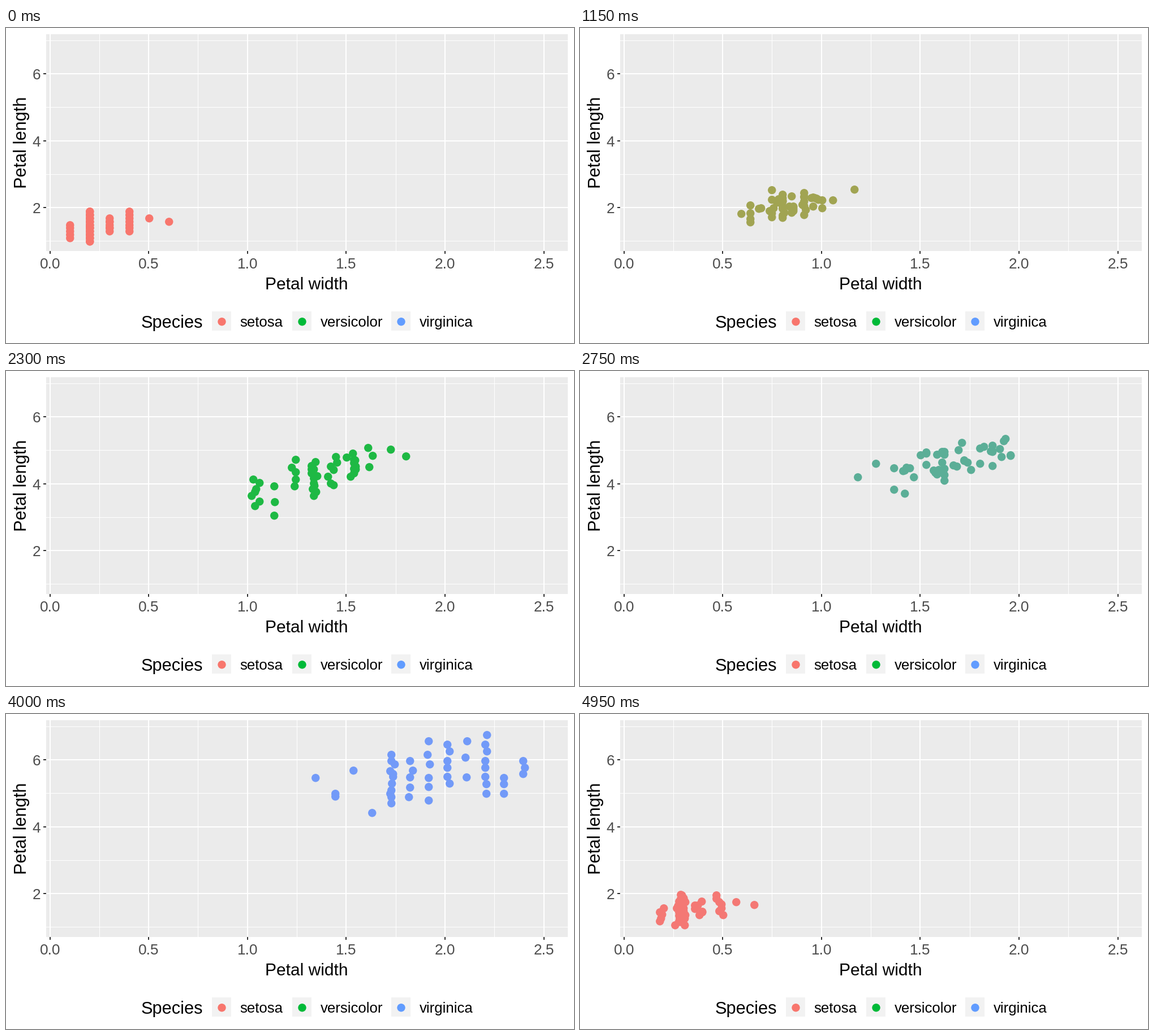
Animation, 1004 px wide and 558 px high, one loop 5 s. Source, as a matplotlib script:

```python
import random

import matplotlib.pyplot as plt
import numpy as np
from matplotlib.animation import FuncAnimation
from matplotlib.patches import Circle, Rectangle

plt.rcParams["text.hinting"] = "native"

W, H, DPI = 1004, 558, 64
FRAMES, INTERVAL = 100, 50
LEFT, TOP, RIGHT, BOTTOM = 71, 11, 993, 395
RADIUS = 7.2

COLORS = np.array([[248, 118, 109], [0, 186, 56], [97, 156, 255]]) / 255
MOVES = [(11, 33), (45, 67), (79, 100)]  # first and last frame of each move

TO_XYZ = np.array([[.4124564, .3575761, .1804375],
                   [.2126729, .7151522, .0721750],
                   [.0193339, .1191920, .9503041]])
WHITE = TO_XYZ.sum(axis=1)
TO_LAB = np.array([[0, 116, 0], [500, -500, 0], [0, 200, -200]])


def make_species(first_width, columns, seed):
    """Stack flowers in columns 0.1 apart, each (count, shortest, longest)."""
    flowers = [(first_width + i / 10, round(length, 1))
               for i, (count, low, high) in enumerate(columns)
               for length in np.linspace(low, high, count)]
    random.Random(seed).shuffle(flowers)
    return np.array(flowers).T


setosa = make_species(.1, [
    (5, 1.1, 1.5), (29, 1.0, 1.9), (7, 1.3, 1.7), (7, 1.3, 1.9),
    (1, 1.7, 1.7), (1, 1.6, 1.6)], seed=1)
versicolor = make_species(1.0, [
    (7, 3.3, 4.1), (3, 3.0, 3.9), (5, 3.9, 4.7), (13, 3.6, 4.6),
    (7, 3.9, 4.8), (10, 4.2, 4.9), (3, 4.5, 5.1), (1, 5.0, 5.0),
    (1, 4.8, 4.8)], seed=2)
virginica = make_species(1.4, [
    (1, 5.6, 5.6), (2, 5.0, 5.1), (1, 5.8, 5.8), (1, 4.5, 4.5),
    (11, 4.8, 6.3), (5, 5.0, 6.1), (6, 4.9, 6.7), (6, 5.4, 6.6),
    (3, 5.6, 6.7), (8, 5.1, 6.9), (3, 5.1, 5.6), (3, 5.7, 6.1)], seed=3)
SPECIES = [setosa, versicolor, virginica]


def rgb_to_lab(rgb):
    linear = np.where(rgb > .04045, ((rgb + .055) / 1.055) ** 2.4, rgb / 12.92)
    xyz = TO_XYZ @ linear / WHITE
    f = np.where(xyz > .008856, np.cbrt(xyz), 7.787 * xyz + 16 / 116)
    return TO_LAB @ f


def lab_to_rgb(lab):
    f = np.linalg.solve(TO_LAB, lab)
    xyz = np.where(f > .2069, f ** 3, (f - 16 / 116) / 7.787) * WHITE
    linear = np.clip(np.linalg.solve(TO_XYZ, xyz), 0, 1)
    rgb = np.where(linear > .0031308, 1.055 * linear ** (1 / 2.4) - .055,
                   12.92 * linear)
    return np.clip(rgb, 0, 1)


def bounce_in(p):
    t = 1 - p
    if t < 4 / 11:
        out = 121 / 16 * t * t
    elif t < 8 / 11:
        out = 363 / 40 * t * t - 99 / 10 * t + 17 / 5
    elif t < 9 / 10:
        out = 4356 / 361 * t * t - 35442 / 1805 * t + 16061 / 1805
    else:
        out = 54 / 5 * t * t - 513 / 25 * t + 268 / 25
    return 1 - out


def grid_x(value):
    return 78 + 349.2 * value


def grid_y(value):
    return 436.75 - 59.17 * value


def dot_x(value):
    return np.floor(78.6 + 349.5 * value) + .25


def dot_y(value):
    return np.floor(438 - 59.3 * value) + .25


fig = plt.figure(figsize=(W / DPI, H / DPI), dpi=DPI, facecolor="white")
ax = fig.add_axes([0, 0, 1, 1])
ax.set_xlim(0, W)
ax.set_ylim(H, 0)
ax.axis("off")


def box(x, y, w, h, color):
    ax.add_patch(Rectangle((x, y), w, h, facecolor=color, linewidth=0,
                           antialiased=False))


def dot(x, y, color):
    return ax.add_patch(Circle((x, y), RADIUS, facecolor=color, linewidth=0))


def label(x, y, text, size, color="black", ha="left", rotation=0):
    ax.text(x, y, text, fontsize=size * 72 / DPI, color=color, ha=ha,
            va="baseline", rotation=rotation, rotation_mode="anchor",
            family="Liberation Sans")


def draw_panel():
    width, height = RIGHT - LEFT, BOTTOM - TOP
    box(LEFT, TOP, width, height, "#EBEBEB")
    for v in np.arange(.25, 2.5, .5):
        box(np.floor(grid_x(v)), TOP, 1, height, "white")
    for v in (1, 3, 5, 7):
        box(LEFT, np.floor(grid_y(v)), width, 1, "white")
    for v in (2, 4, 6):
        y = np.floor(grid_y(v))
        box(LEFT, y - 1, width, 2, "white")
        box(LEFT - 5, y - 1, 5, 2, "#333333")
        label(61.5, y + 10, str(v), 26.2, "#4D4D4D", "right")
    for v in np.arange(0, 2.6, .5):
        x = np.floor(grid_x(v))
        box(x - 1, TOP, 2, height, "white")
        box(x - 1, BOTTOM, 2, 5, "#333333")
        label(x, 426, f"{v:.1f}", 26.2, "#4D4D4D", "center")
    label(531, 463, "Petal width", 30, ha="center")
    label(36, 202.5, "Petal length", 30.7, ha="center", rotation=90)


def draw_legend():
    label(238.5, 531, "Species", 30.7)
    entries = [(364, 413, "setosa"), (506, 555.5, "versicolor"),
               (681, 730.5, "virginica")]
    for (key_x, text_x, name), color in zip(entries, COLORS):
        box(key_x, 502, 34, 34, "#F2F2F2")
        dot(key_x + 17.5, 520.25, color)
        label(text_x, 529, name, 25.8)


draw_panel()
draw_legend()
dots = [dot(0, 0, COLORS[0]) for _ in range(setosa.shape[1])]
LABS = [rgb_to_lab(c) for c in COLORS]


def state_at(frame):
    """Return the current species, the next one and the progress between."""
    for i, (start, end) in enumerate(MOVES):
        if frame <= end:
            return i, (i + 1) % 3, max(0, frame - start) / (end - start)


def update(frame):
    now, after, p = state_at(frame)
    a, b = SPECIES[now], SPECIES[after]
    xs = dot_x(a[0] + (b[0] - a[0]) * p)
    ys = dot_y(a[1] + (b[1] - a[1]) * bounce_in(p))
    color = lab_to_rgb(LABS[now] + (LABS[after] - LABS[now]) * p)
    for d, x, y in zip(dots, xs, ys):
        d.center = x, y
        d.set_facecolor(color)
    return dots


anim = FuncAnimation(fig, update, frames=FRAMES, interval=INTERVAL,
                     repeat=True, repeat_delay=0, blit=False)
plt.show()
```
